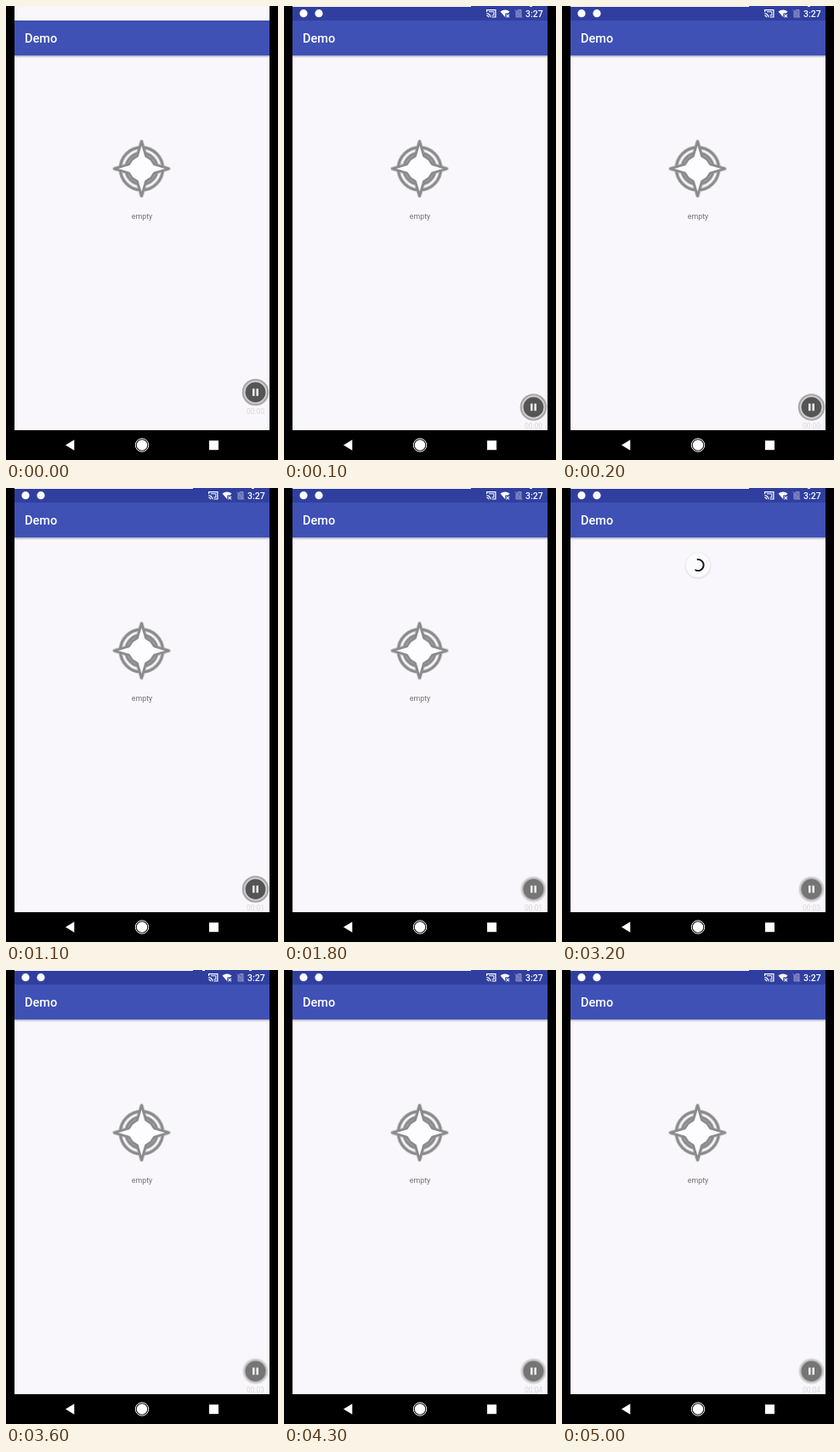
Write an HTML page that moves like this. It is 320 px wide and 533 px high and loops after 5100 ms.

```html
<!DOCTYPE html>
<html lang="en">
<head>
<meta charset="utf-8">
<title>Pull to refresh</title>
<style>
html, body { margin: 0; width: 100%; height: 100%; overflow: hidden; background: #000; }
svg { display: block; width: 320px; height: 533px; }
text { font-family: Roboto, sans-serif; }
</style>
</head>
<body>
<svg viewBox="0 0 320 533">
  <defs>
    <clipPath id="screen"><rect x="10" width="300" height="498"/></clipPath>
    <linearGradient id="drop" x2="0" y2="1">
      <stop stop-color="#777798" stop-opacity=".6"/>
      <stop offset="1" stop-color="#777798" stop-opacity="0"/>
    </linearGradient>
    <radialGradient id="halo">
      <stop offset=".68" stop-color="#555" stop-opacity=".65"/>
      <stop offset="1" stop-color="#777" stop-opacity="0"/>
    </radialGradient>
    <path id="star" d="M0-32 5-15 11-11 15-5 32 0 15 5 11 11 5 15 0 32-5 15-11 11-15 5-32 0-15-5-11-11-5-15Z"/>
  </defs>
  <rect width="320" height="533"/>
  <g clip-path="url(#screen)">
    <rect x="10" width="300" height="498" fill="#f9f7fb"/>

    <g id="empty">
      <g transform="translate(159.5 191)" fill="none" stroke-linejoin="round">
        <g stroke="#c9c8ca" stroke-width="4.6">
          <circle r="25"/><circle r="18.5"/><use href="#star"/>
        </g>
        <g stroke="#8b8a8c" stroke-width="2.8">
          <circle r="25"/><circle r="18.5"/><use href="#star" fill="#fdfcfe"/>
        </g>
      </g>
      <text x="160" y="250" font-size="8.8" text-anchor="middle" fill="#727174">empty</text>
    </g>

    <g id="spinner" display="none">
      <circle cy=".7" r="15.6" fill="#e9e7eb"/>
      <circle r="14.3" fill="#fbfafc"/>
      <path id="arc" fill="none" stroke="#111" stroke-width="1.8"/>
    </g>

    <rect x="10" y="58" width="300" height="3" fill="url(#drop)"/>
    <rect x="10" y="17" width="300" height="41" fill="#3f51b5"/>
    <text x="22" y="43" font-size="14.5" font-weight="500" fill="#fff">Demo</text>

    <g id="status" display="none" fill="#fff">
      <rect x="10" width="300" height="17" fill="#303f9f"/>
      <rect x="10" width="210" height="1"/>
      <rect id="dash" x="289" width="3" height="1"/>
      <rect id="dash2" x="231" width="3" height="1"/>
      <circle cx="23" cy="8.7" r="4.6"/>
      <circle cx="41" cy="8.7" r="4.6"/>
      <g fill="none" stroke="#fff" stroke-width="1.2">
        <path d="M238.6 7V4.7H248.9V13H244.5M238.3 8.6A4.6 4.6 0 0 1 242.9 13.3M238.3 11A2.3 2.3 0 0 1 240.6 13.3"/>
        <path d="M241 6.8H246.8V11H244.4" stroke-width="1"/>
      </g>
      <path d="M254.5 6.5Q260 2.5 265.5 6.5L263.7 8.6H260.3V13.2Z"/>
      <path d="M261.5 9.8 265 13.3M265 9.8 261.5 13.3" stroke="#fff" stroke-width="1.1"/>
      <g stroke="#8990c6" fill="none">
        <path d="M273.5 6 275.5 4.5H279V13H273V7Z" fill="#6a73b5"/>
        <path d="M271.5 4.5 280.2 13.8"/>
      </g>
      <text x="284" y="12.6" font-size="10.5" font-weight="500">3:27</text>
    </g>

    <g id="rec">
      <circle r="16" fill="url(#halo)"/>
      <g id="ring" fill="none">
        <circle r="14.6" stroke="#aaa8ab" stroke-width="2.4"/>
        <circle r="12.7" stroke="#d2d0d3" stroke-width="1.6"/>
      </g>
      <circle id="disc" r="11.8" fill="#555456"/>
      <path d="M-2.2-4.2V4.2M2.2-4.2V4.2" stroke="#f4f3f5" stroke-width="2.5"/>
      <text id="count" y="25" font-size="8.5" text-anchor="middle" fill="#d9d7db">00:00</text>
    </g>
  </g>

  <g fill="#fff">
    <path d="M70 515.5 80.3 509.3V521.7Z"/>
    <circle cx="160" cy="515.5" r="6.2"/>
    <circle cx="160" cy="515.5" r="7.7" fill="none" stroke="#fff" stroke-width="1"/>
    <rect x="239" y="510.2" width="11" height="11"/>
  </g>
</svg>
<script>
const LOOP = 5100;
const T = { bar: 100, fade: 1500, clear: 2300, spin: 2700, done: 3400, dashOff: 4900 };
const el = id => document.getElementById(id);
const set = (id, name, value) => el(id).setAttribute(name, value);
const show = (id, on) => set(id, 'display', on ? 'inline' : 'none');
const clamp = v => Math.max(0, Math.min(1, v));
const ease = v => 1 - (1 - v) ** 2;

function arcPath(from, sweep, r) {
  const point = deg => {
    const a = deg * Math.PI / 180;
    return `${(r * Math.cos(a)).toFixed(2)} ${(r * Math.sin(a)).toFixed(2)}`;
  };
  return `M${point(from)}A${r} ${r} 0 ${sweep > 180 ? 1 : 0} 1 ${point(from + sweep)}`;
}

function drawSpinner(t) {
  const scale = clamp((t - T.spin) / 150) * clamp((T.done + 150 - t) / 150);
  show('spinner', scale > 0);
  set('spinner', 'transform', `translate(160 90.5) scale(${scale})`);
  const p = clamp((t - T.spin - 150) / 1332);
  set('arc', 'd', arcPath(216 * p - 157, 5 + 280 * ease(clamp(p * 2)), 6.6));
}

function draw(t) {
  const bar = t >= T.bar;
  show('status', bar);
  show('empty', t < T.clear || t >= T.done);
  show('dash', t < T.dashOff);
  show('dash2', t >= T.done && t < 4300);
  set('dash', 'x', t >= T.done ? 286 : 289);
  drawSpinner(t);

  const fade = clamp((t - T.fade) / 200);
  const grey = Math.round(85 + 32 * fade);
  set('rec', 'transform', `translate(293.5 ${bar ? 471 : 453.5})`);
  set('ring', 'opacity', 1 - fade);
  set('disc', 'fill', `rgb(${grey},${grey},${grey})`);
  el('count').textContent = '00:0' + Math.max(0, Math.floor((t - 100) / 1000));
}

const start = performance.now();
function tick() {
  draw((performance.now() - start) % LOOP);
  requestAnimationFrame(tick);
}
draw(0);
requestAnimationFrame(tick);
</script>
</body>
</html>
```
